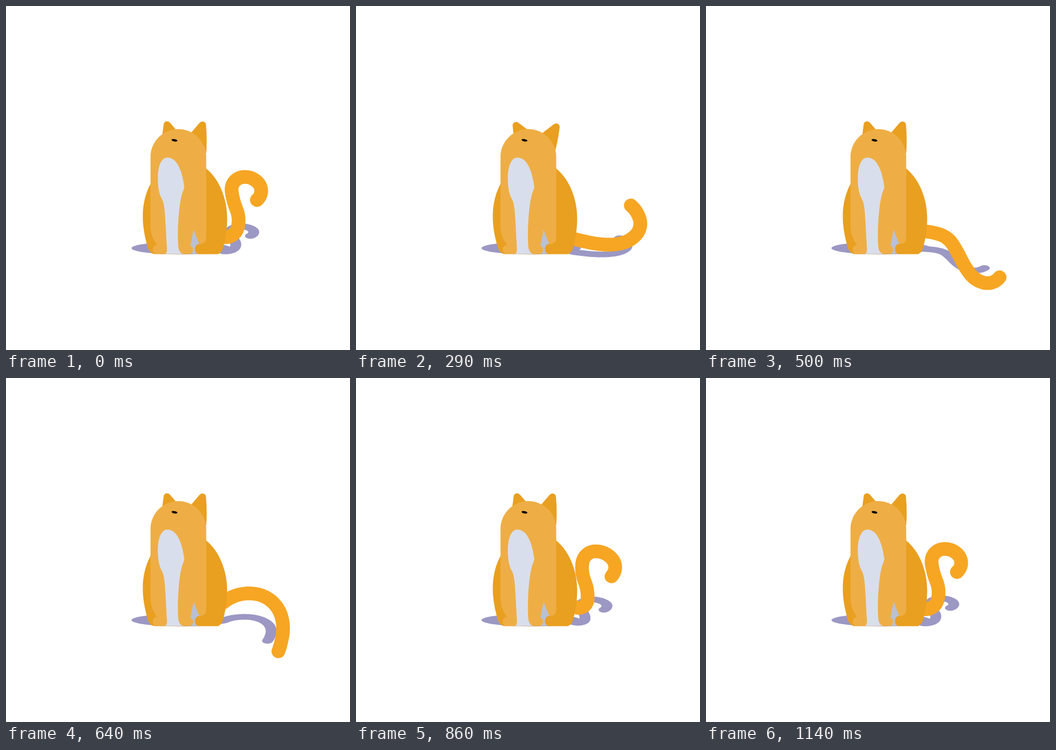
Write an HTML page that moves like this. It is 640 px wide and 640 px high and loops after 1.28 s.

```html
<!DOCTYPE html>
<html>
<head>
<meta charset="utf-8">
<style>
  html, body { margin: 0; width: 100%; height: 100%; overflow: hidden; background: #fff; }
  svg { display: block; width: 100%; height: 100%; }
  .tail { fill: none; stroke-width: 25.5; stroke-linecap: round; stroke-linejoin: round; }
</style>
</head>
<body>
<svg viewBox="0 0 640 640">
  <ellipse cx="326" cy="450.5" rx="92.5" ry="11.7" fill="#9b98c4"/>
  <path id="tailShadow" class="tail" stroke="#9b98c4" transform="matrix(.797 0 0 .415 82.6 278)"/>
  <path id="tail" class="tail" stroke="#f6a623"/>
  <g fill="#e99f20">
    <path id="leftEar" d="M290 246L293.5 219Q295 214.5 300 214.5Q303 214.5 305 217L322 237Z"/>
    <path id="rightEar" d="M340 241L360 217.5Q363 214.5 366 214.7Q371.5 215.5 372 221Q374.5 246 372.5 274Z"/>
    <path id="body" d="M275 461.5Q267 459 264 450C249 400 252 360 271 327L372 302C396 321 411.5 357 411.5 395C411.5 416 408 435 404 449Q401 461.5 391 461.5Z"/>
  </g>
  <path id="gap" fill="#b9c0d3" d="M340 414H358L362 446V461.5H340Z"/>
  <path id="hindPaw" fill="#e99f20" d="M360 442.5H396V461.5H358Q351.5 460 351.5 452Q352 443 360 442.5Z"/>
  <path id="front" fill="#eeae45" d="M268.8 281A51.85 52 0 0 1 372.5 281V432Q372 442 362 442.5L359.5 443L349 416L343 446Q348 448 348 453Q347.5 461.5 341 461.5H278Q273 459 273 452.5Q273.5 446 281 444Q268.8 430 268.8 407Z"/>
  <path id="chest" fill="#d9deec" d="M300 282C289 282 282.5 298 282.5 321C282.5 338 285 350 290 359C296 370 296 390 299.5 452Q299.7 461.5 294 461.5H330Q323 460 321 451C318 425 321 362 330 343Q332 339 331.5 335C327 303 317 282 300 282Z"/>
  <ellipse id="eye" cx="313.5" cy="249.8" rx="5.5" ry="2.2" transform="rotate(10 313.5 249.8)"/>
</svg>
<script>
const LOOP = 1280, STEPS = 18, BASE_X = 404, JOINTS = 6, SLICES = 8;
const byId = id => document.getElementById(id);

// The tail is a chain of arcs: height of its base, its length,
// and its heading in degrees at evenly spaced joints
const pose = (step, baseY, length, ...headings) => ({ step, values: [baseY, length, ...headings] });
const curled = [430, 210, 10, -75, -112, -98, -12, 50, 140];
const poses = [
  pose(0, ...curled),
  pose(2, 433, 168, 5, -12, -75, -112, -104, -88, -30),
  pose(4, 433, 185, 14, 12, 3, -14, -48, -106, -140),
  pose(7, 419, 190, 4, 18, 58, 64, 52, 12, -52),
  pose(9, 418, 198, -40, -14, 10, 42, 74, 98, 110),
  pose(12, 424, 212, 40, -85, -112, -82, 0, 50, 135),
  pose(16, ...curled)
];

// Monotone cubic interpolation between poses, at rest at both ends
function valueAt(j, t) {
  const last = poses.length - 1;
  const span = i => poses[i + 1].step - poses[i].step;
  const slope = i => (poses[i + 1].values[j] - poses[i].values[j]) / span(i);
  const tangent = i => {
    if (i === 0 || i === last) return 0;
    const a = slope(i - 1), b = slope(i);
    return a * b > 0 ? 2 * a * b / (a + b) : 0;
  };
  let i = 0;
  while (i < last - 1 && t >= poses[i + 1].step) i++;
  const h = span(i), u = Math.min((t - poses[i].step) / h, 1), v = 1 - u;
  return v * v * (1 + 2 * u) * poses[i].values[j] + u * u * (3 - 2 * u) * poses[i + 1].values[j]
    + h * u * v * (v * tangent(i) - u * tangent(i + 1));
}

function tailPath(t) {
  const [baseY, length, ...headings] = curled.map((_, j) => valueAt(j, t));
  const ds = length / (JOINTS * SLICES);
  let x = BASE_X, y = baseY, d = `M${x} ${y}`;
  for (let n = 0; n < JOINTS * SLICES; n++) {
    const joint = Math.floor(n / SLICES), part = (n % SLICES + 0.5) / SLICES;
    const heading = headings[joint] + part * (headings[joint + 1] - headings[joint]);
    x += ds * Math.cos(heading * Math.PI / 180);
    y += ds * Math.sin(heading * Math.PI / 180);
    d += `L${x.toFixed(2)} ${y.toFixed(2)}`;
  }
  return d;
}

function draw(now) {
  const step = Math.floor(now % LOOP / LOOP * STEPS + 0.1) % STEPS;
  const d = tailPath(step);
  byId("tail").setAttribute("d", d);
  byId("tailShadow").setAttribute("d", d);
  const twitch = Math.max(0, 1 - Math.abs(step - 4) / 2);
  byId("leftEar").setAttribute("transform", `rotate(${-13 * twitch} 305 230)`);
  byId("rightEar").setAttribute("transform", `rotate(${12 * twitch} 351 256)`);
}

const start = performance.now();
function tick() {
  draw(performance.now() - start);
  requestAnimationFrame(tick);
}
tick();
</script>
</body>
</html>
```
